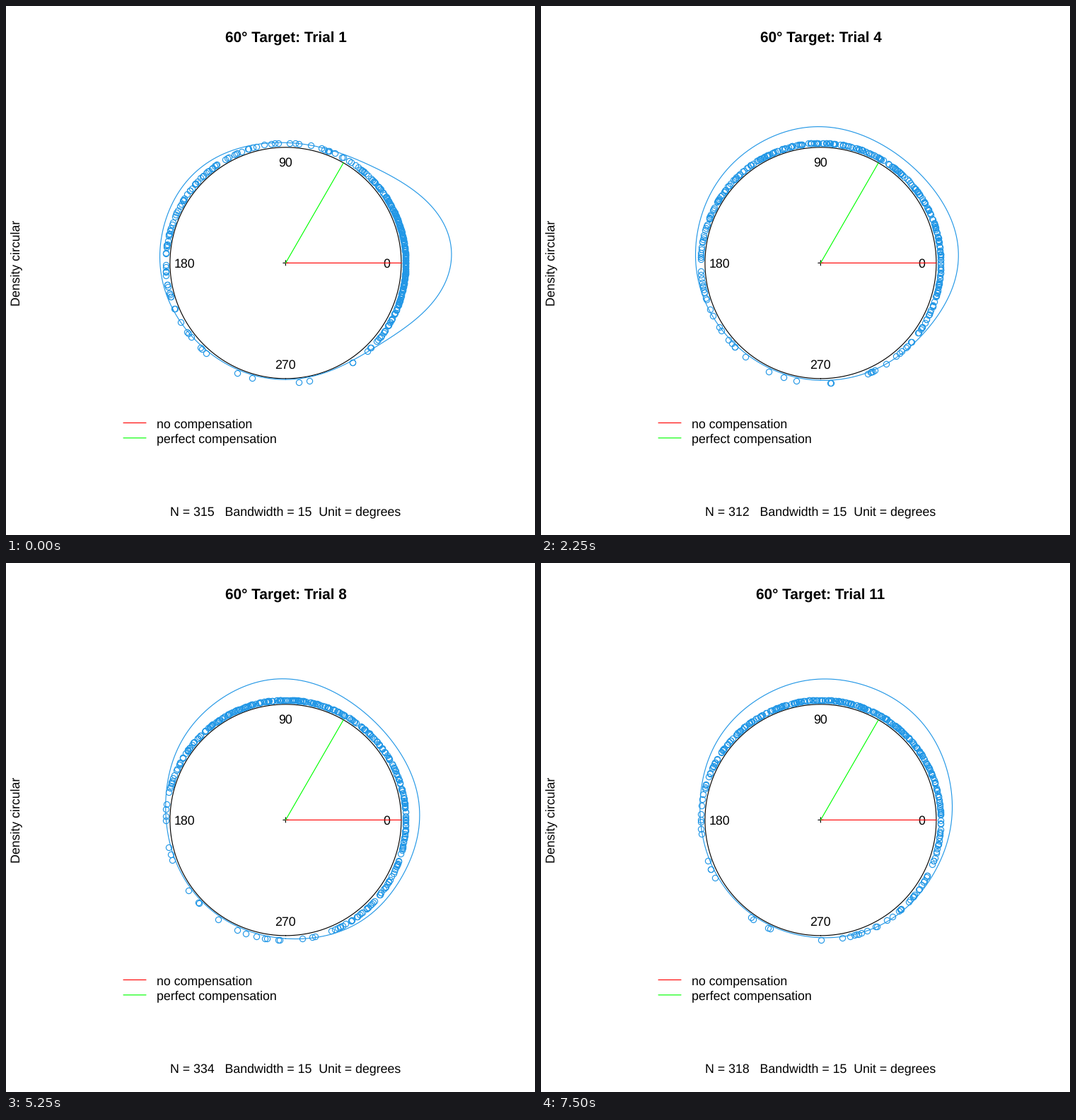
Recreate the animation shown at these times as a matplotlib script. Size 748x748 px, loop 8 s.

```python
import numpy as np
import matplotlib.pyplot as plt
from matplotlib.animation import FuncAnimation

SIZE, DPI = 748, 64
PT = 72 / DPI          # points per pixel
EM = 17.8              # text size in pixels
CX, CY = 395.4, 363.35
R, DOT_R = 163.5, 169.8
BLUE = "#2297E6"

plt.rcParams["font.family"] = "Liberation Sans"
plt.rcParams["text.hinting"] = "no_hinting"

# Height of the density curve above the circle at a few headings, by trial;
# the trials not listed lie halfway between their neighbours.
HEADINGS = np.array([4, 48, 92, 136, 182, 312])
SPREAD, FLOOR = 24, 1.5
TRIALS = [1, 2, 4, 6, 8, 10, 11]
COUNTS = [315, 330, 312, 315, 334, 297, 318]
HEIGHTS = np.array([
    [71.5, 20, 6.8, 17.6, 13.8, 7],
    [31.5, 20.5, 21.6, 26.5, 20, 14.5],
    [31.8, 24.5, 29.3, 23.3, 12.6, 8.5],
    [27.5, 21, 32.7, 26, 10, 10.5],
    [26.3, 24, 36.2, 24, 5, 16],
    [23, 30.5, 41.2, 25, 5.6, 11.5],
    [23, 36, 35.5, 23, 6, 9.5],
])
ANGLES = np.linspace(-90, 270, 1441)


def bumps(deg):
    """One bell curve per heading, wrapped around the circle."""
    gap = (np.asarray(deg)[:, None] - HEADINGS + 180) % 360 - 180
    return np.exp(-gap ** 2 / (2 * SPREAD ** 2))


def make_trial(num):
    rng = np.random.default_rng(num)
    count = round(np.interp(num, TRIALS, COUNTS))
    keys = [np.interp(num, TRIALS, column) for column in HEIGHTS.T]
    weights = np.linalg.solve(bumps(HEADINGS), np.array(keys) - FLOOR)
    density = np.maximum(FLOOR + bumps(ANGLES) @ weights, 0.5)
    total = np.cumsum(density)
    picks = (np.arange(count) + rng.normal(0, 2, count)) / count % 1
    return count, density, np.interp(picks, total / total[-1], ANGLES)


trials = [make_trial(num) for num in range(1, 12)]


def polar(deg, r):
    t = np.radians(deg)
    return CX + r * np.cos(t), CY - r * np.sin(t)


fig = plt.figure(figsize=(SIZE / DPI, SIZE / DPI), dpi=DPI, facecolor="white")
ax = fig.add_axes([0, 0, 1, 1])
ax.set_xlim(0, SIZE)
ax.set_ylim(SIZE, 0)
ax.axis("off")


def line(x, y, color, z=2):
    item, = ax.plot(x, y, color=color, lw=1.15 * PT, zorder=z, snap=False,
                    solid_capstyle="round")
    return item


def label(x, y, text, size=EM, ha="center", **kw):
    return ax.text(x, y, text, fontsize=size * PT, ha=ha, va="baseline", **kw)


line(*polar(ANGLES, R), "black")
line([CX - 3.6, CX + 3.6], [CY, CY], "black")
line([CX, CX], [CY - 3.6, CY + 3.6], "black")
for deg in range(0, 360, 90):
    x, y = polar(deg, 143.2)
    label(x, y + 6.3, str(deg), zorder=3)

for deg, color, y, text in ((0, "#FF0000", 589.45, "no compensation"),
                            (60, "#00FF00", 610.8, "perfect compensation")):
    x_end, y_end = polar(deg, R)
    line([CX, x_end], [CY, y_end], color, z=6)
    line([166, 198], [y, y], color)
    label(213.3, y + 6.4, text, ha="left")

label(19.3, CY, "Density circular", rotation=90, rotation_mode="anchor")
title = label(CX, 50.9, "", size=20.8, weight="bold")
caption = label(CX, 720.5, "")
dots, = ax.plot([], [], "o", ms=8.2 * PT, mfc="none", mec=BLUE,
                mew=1.15 * PT, zorder=4, snap=False)
outline = line([], [], BLUE, z=5)


def draw(frame):
    num = frame // 3 + 1
    count, density, spots = trials[num - 1]
    title.set_text(f"60° Target: Trial {num}")
    caption.set_text(f"N = {count}   Bandwidth = 15  Unit = degrees")
    dots.set_data(*polar(spots, DOT_R))
    outline.set_data(*polar(ANGLES, R + density))
    return title, caption, dots, outline


anim = FuncAnimation(fig, draw, frames=32, interval=250, repeat=True,
                     repeat_delay=0, init_func=lambda: draw(0))
plt.show()
```
